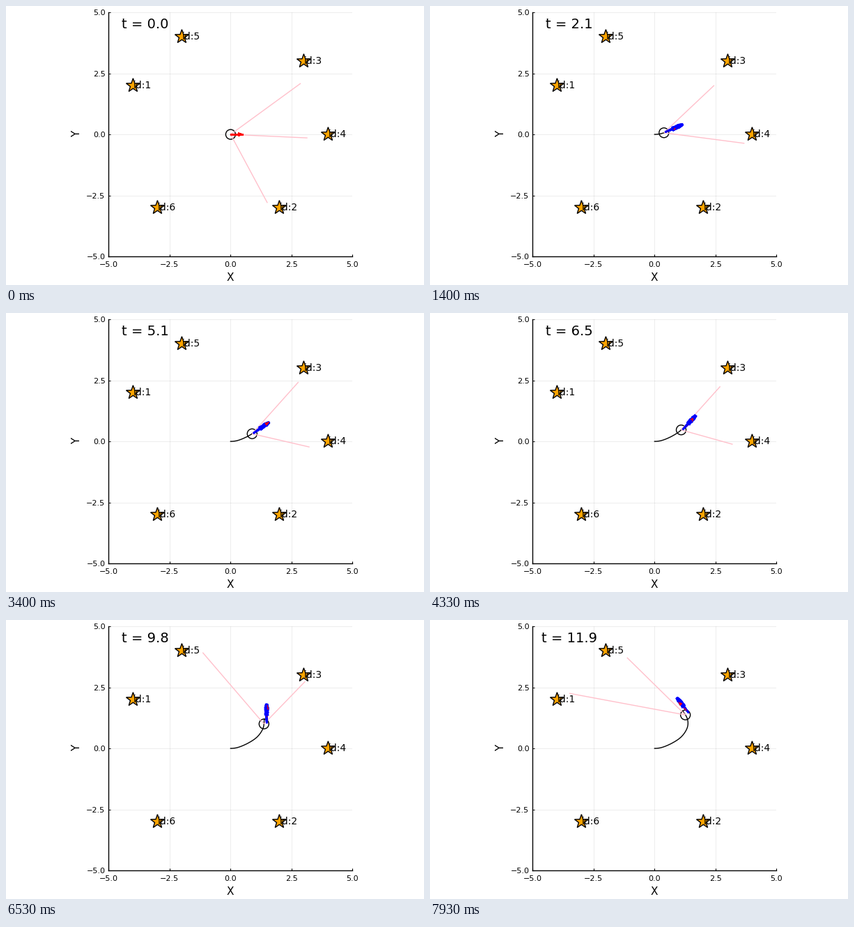
These frames come from a looping animation (600x400 px, 8000 ms). A matplotlib script:

```python
import matplotlib.pyplot as plt
import numpy as np
from matplotlib.animation import FuncAnimation
from matplotlib.collections import LineCollection, PolyCollection

plt.rcParams["font.family"] = "DejaVu Sans"

W, H, DPI = 600, 400, 100
PX = 1 / 35                     # one pixel in data units
STEPS, DT, LOOP_MS = 120, 0.1, 8000
TICK_MS = 25                    # timer grid, finer than a simulation step
SPEED, RADIUS, ARROW, COUNT = 0.186, 0.2, 0.5, 80
FOV = np.radians(60)
LANDMARKS = np.array([(-4, 2), (2, -3), (3, 3), (4, 0), (-2, 4), (-3, -3)], float)

rng = np.random.default_rng(7)
times = np.arange(STEPS) * DT


def unit(angle):
    return np.stack([np.cos(angle), np.sin(angle)], axis=-1)


def normal(u):
    return np.stack([-u[..., 1], u[..., 0]], axis=-1)


# True motion: constant speed along a turning heading
heading = np.radians(np.interp(times, [0, 2.1, 5.5, 8.6, 11.9], [0, 20, 34, 65, 125]))
moves = SPEED * DT * unit((heading[1:] + heading[:-1]) / 2)
path = np.vstack([[0, 0], np.cumsum(moves, axis=0)])

# Biased sensor: short ranges, bearings turned clockwise
range_ratio = np.clip(rng.normal(0.86, 0.08, (STEPS, 6)), 0.65, 1.05)
bearing_error = np.radians(rng.normal(-4.8, 1.8, (STEPS, 6)))

# Particle cloud: settles a little ahead of the robot and wobbles there
grow = np.minimum(1, times / 1.5)
drift = 7.2 * PX * grow[:, None] * unit(0.5 * heading + np.radians(15))
cloud_dir = heading + np.radians(3) * grow
rate = rng.uniform(0.5, 2.5, (3, COUNT))
phase = rng.uniform(0, 2 * np.pi, (3, COUNT))
BEST = COUNT - 4


def rays(k):
    out = []
    for mark, ratio, error in zip(LANDMARKS, range_ratio[k], bearing_error[k]):
        dx, dy = mark - path[k]
        bearing = np.arctan2(dy, dx)
        if abs((bearing - heading[k] + np.pi) % (2 * np.pi) - np.pi) < FOV:
            reach = ratio * np.hypot(dx, dy)
            out.append([path[k], path[k] + reach * unit(bearing + error)])
    return out


def particles(k):
    along, side, turn = np.sin(rate * times[k] + phase) * grow[k]
    u = unit(cloud_dir[k])
    tails = path[k] + drift[k] + PX * (5.5 * along[:, None] * u
                                       + 0.6 * side[:, None] * normal(u))
    return tails, cloud_dir[k] + np.radians(4) * turn


def star(center, outer=10.4 * PX, inner=0.4):
    n = np.arange(10)
    r = np.where(n % 2, inner, 1) * outer
    return center + r[:, None] * unit(np.pi / 2 + n * np.pi / 5)


fig = plt.figure(figsize=(W / DPI, H / DPI), dpi=DPI, facecolor="white")
ax = fig.add_axes([147.4 / W, 40.9 / H, 350 / W, 350 / H])
ax.set(xlim=(-5, 5), ylim=(-5, 5))
ax.set_axisbelow(True)
ticks = np.arange(-5, 5.1, 2.5)
names = [f"{v:.1f}".replace("-", "\u2212") for v in ticks]
ax.set_xticks(ticks, names)
ax.set_yticks(ticks, names)
ax.tick_params(direction="in", length=2.5, width=0.8, labelsize=8)
ax.tick_params(axis="x", pad=5)
ax.tick_params(axis="y", pad=3.6)
ax.grid(color="black", alpha=0.1, lw=0.5)
ax.spines[["top", "right"]].set_visible(False)
ax.spines[["left", "bottom"]].set_linewidth(1)
fig.text(322 / W, 1 - 389 / H, "X", size=11, ha="center", va="center")
fig.text(102 / W, 1 - 183.5 / H, "Y", size=11, ha="center", va="center", rotation=90)

for n, mark in enumerate(LANDMARKS, 1):
    ax.add_patch(plt.Polygon(star(mark), fc="orange", ec="black", lw=1, zorder=3))
    ax.text(*mark, f"id:{n}", size=10, ha="left", va="center", zorder=8)

clock = ax.text(-3.5, 4.34, "", size=14, ha="center", va="baseline", zorder=8)
trail, = ax.plot([], [], color="black", lw=1, zorder=4)
nose, = ax.plot([], [], color="black", lw=1, zorder=4)
body = ax.add_patch(plt.Circle((0, 0), RADIUS, fill=False, ec="black", lw=1, zorder=4))
beams = ax.add_collection(LineCollection([], colors="pink", linewidths=1, zorder=5))
colors = ["red" if i == BEST else "blue" for i in range(COUNT)]
shafts = ax.add_collection(LineCollection([], colors=colors, linewidths=1, zorder=6))
heads = ax.add_collection(PolyCollection([], facecolors=colors, edgecolors=colors,
                                         linewidths=0.5, zorder=7))


def draw(frame):
    # Steps fall on times rounded to 10 ms, so allow a small lead
    k = int((frame * TICK_MS + 9) * STEPS / LOOP_MS)
    clock.set_text(f"t = {times[k]:.1f}")
    trail.set_data(*path[:k + 1].T)
    nose.set_data(*np.array([path[k], path[k] + RADIUS * unit(heading[k])]).T)
    body.center = path[k]
    beams.set_segments(rays(k))

    tails, angle = particles(k)
    u = unit(angle)
    tips = tails + ARROW * u
    base = tips - 6 * PX * u
    wing = 2 * PX * normal(u)
    # At the start all arrows coincide and the best one lies on top
    order = np.arange(COUNT) if k else np.full(COUNT, BEST)
    tint = [colors[i] for i in order]
    shafts.set_segments(np.stack([tails, tips], axis=1))
    shafts.set_color(tint)
    heads.set_verts(np.stack([tips, base + wing, base - wing], axis=1))
    heads.set_color(tint)


anim = FuncAnimation(fig, draw, frames=LOOP_MS // TICK_MS, interval=TICK_MS,
                     repeat=True, repeat_delay=0)
plt.show()
```
